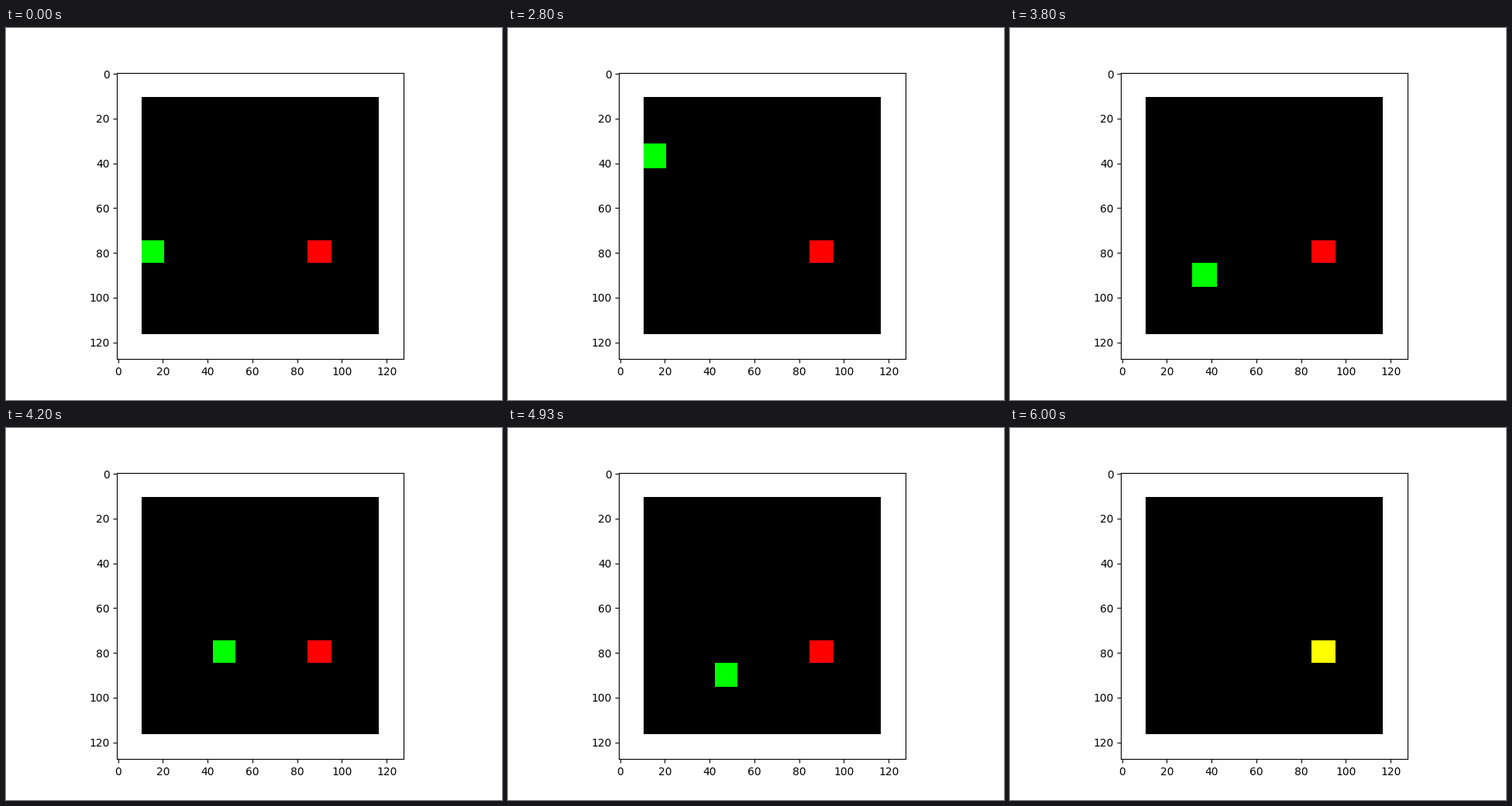
A matplotlib script for the animation above (6.67 s loop, 640 by 480 pixels).

```python
import numpy as np
import matplotlib.pyplot as plt
from matplotlib.animation import FuncAnimation

SIZE, TILES = 128, 12
LOOP_MS, FRAMES, MOVE_COUNT = 6670, 290, 100
INTERVAL = LOOP_MS // FRAMES
LEAD = 0.4  # fraction of a move, so a move is never drawn late
RED, GREEN = (255, 0, 0), (0, 255, 0)
START, GOAL = (1, 7), (8, 7)
STEPS = {"U": (0, -1), "D": (0, 1), "L": (-1, 0), "R": (1, 0), ".": (0, 0)}

# Waiting at the wall, a detour, a closed cycle, then the run to the goal.
MOVES = (
    "." * 28 + "UU" + "." * 5 + "U" + "." * 6
    + "UUURDDDDDR"
    + "D" + "DRUL" * 7 + "DRU"
    + "URRRRD"
).ljust(MOVE_COUNT + 1, ".")

EDGES = np.rint(np.arange(TILES + 1) * SIZE / TILES).astype(int)


def walk(start, moves):
    x, y = start
    cells = []
    for move in moves:
        dx, dy = STEPS[move]
        x, y = x + dx, y + dy
        cells.append((x, y))
    return cells


def tile(col, row):
    return slice(EDGES[row], EDGES[row + 1]), slice(EDGES[col], EDGES[col + 1])


def render(agent):
    grid = np.full((SIZE, SIZE, 3), 255, dtype=np.uint8)
    inside = slice(EDGES[1], EDGES[-2])
    grid[inside, inside] = 0
    # Colours add up, so the agent on the goal turns yellow.
    grid[tile(*GOAL)] += np.array(RED, dtype=np.uint8)
    grid[tile(*agent)] += np.array(GREEN, dtype=np.uint8)
    return grid


path = walk(START, MOVES)

fig, ax = plt.subplots(figsize=(6.4, 4.8), dpi=100)
image = ax.imshow(render(START), interpolation="nearest")


def update(frame):
    step = int(frame * MOVE_COUNT / FRAMES + LEAD)
    image.set_data(render(path[step]))
    return (image,)


anim = FuncAnimation(fig, update, frames=FRAMES, interval=INTERVAL,
                     repeat=True, repeat_delay=0, blit=False)
plt.show()
```
